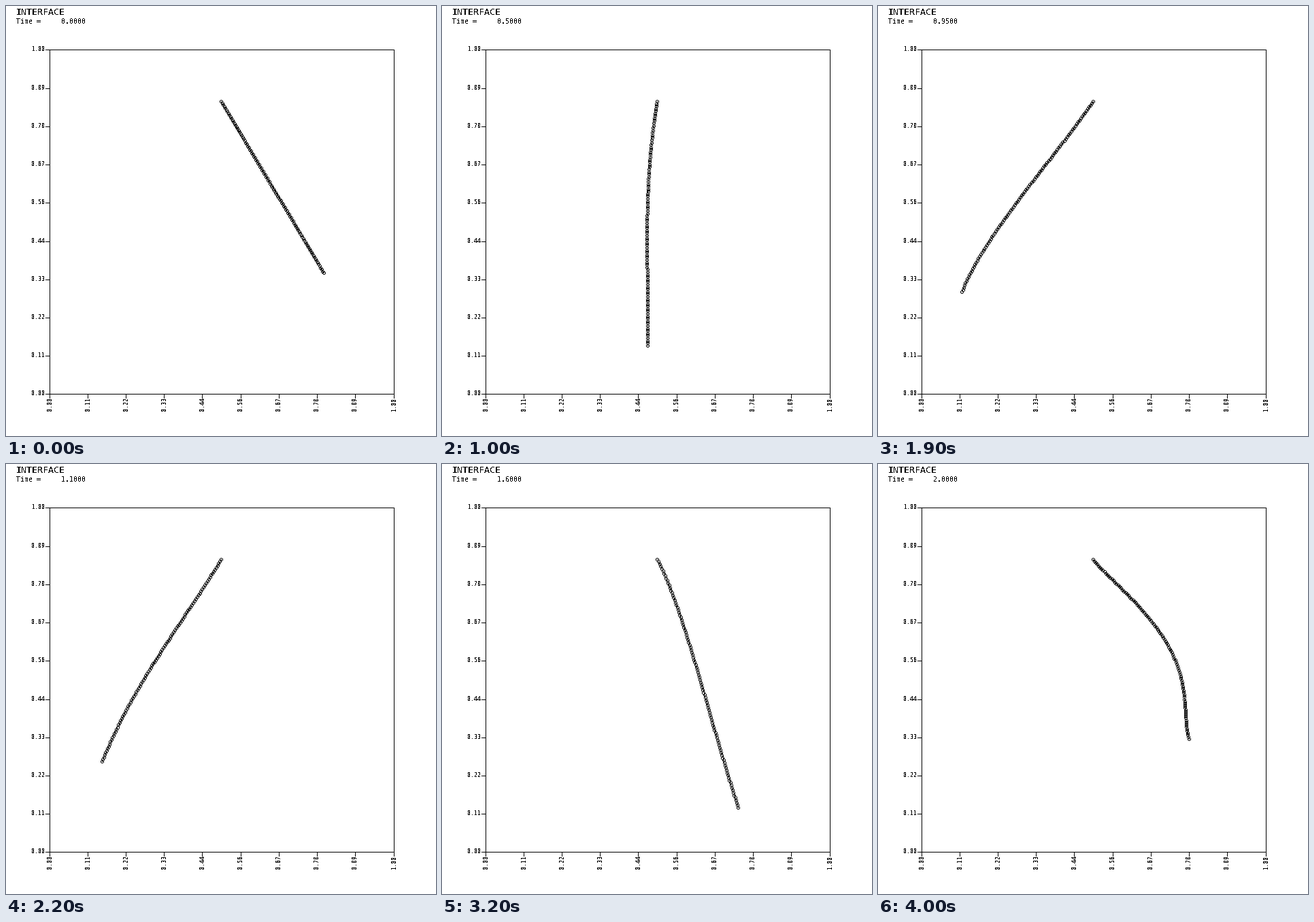
A matplotlib script that plays this animation: 632x632 px, repeating every 4.1 s.

```python
import numpy as np
import matplotlib.pyplot as plt
from matplotlib.animation import FuncAnimation

SIZE, DPI = 632, 100
PX = 72 / DPI                 # one pixel in points
LO, HI = 63, 569              # plot box edges
PIVOT = np.array([316, 140])
BEADS = 101
FRAMES, STEP = 41, 0.05

# Key poses of the swing: time, chord angle (deg), chord length, sideways bow
POSES = np.array([
    (0.00, 30.9, 293.8, 0), (0.30, 17.5, 382.7, -6.8),
    (0.60, -12.8, 336, -9), (0.75, -26.2, 326.5, -11.8),
    (1.10, -30.5, 344.7, -10), (1.35, -5.7, 340.7, -7),
    (1.60, 18.1, 383.9, 6.8), (1.80, 29, 321.4, 22),
    (2.00, 28.1, 299.3, 42.5)])


def spline(x, y, q):
    """Natural cubic spline through (x, y), evaluated at q."""
    n, h = len(x), np.diff(x)
    slope = np.diff(y) / h
    a, b = np.eye(n), np.zeros(n)
    for i in range(1, n - 1):
        a[i, i - 1:i + 2] = h[i - 1], 2 * (h[i - 1] + h[i]), h[i]
        b[i] = 6 * (slope[i] - slope[i - 1])
    m = np.linalg.solve(a, b)
    k = np.clip(np.searchsorted(x, q) - 1, 0, n - 2)
    u, v, w = q - x[k], x[k + 1] - q, h[k]
    return ((m[k] * v**3 + m[k + 1] * u**3) / (6 * w)
            + (y[k] / w - m[k] * w / 6) * v
            + (y[k + 1] / w - m[k + 1] * w / 6) * u)


times = np.arange(FRAMES) * STEP
# mirrored in time, so that the motion starts at rest
knots = np.r_[-POSES[:0:-1, 0], POSES[:, 0]]
angle, length, bow = (spline(knots, np.r_[col[:0:-1], col], times)
                      for col in POSES[:, 1:].T)
angle = np.radians(angle)
# height of the bulge, travelling down and up the string
bulge = 0.47 + 0.2 * np.cos(4.6 * (times - 0.95))


def string_curve(i):
    """Dense curve of the string and its evenly spaced beads, in pixels."""
    f = np.linspace(0, 1, 800)
    p, sharp = bulge[i], 2.8
    shape = ((f / p)**p * ((1 - f) / (1 - p))**(1 - p))**sharp
    x = length[i] * np.sin(angle[i]) * f + bow[i] * shape
    y = length[i] * np.cos(angle[i]) * f
    arc = np.r_[0, np.cumsum(np.hypot(np.diff(x), np.diff(y)))]
    s = np.linspace(0, arc[-1], BEADS)
    beads = np.column_stack([np.interp(s, arc, x), np.interp(s, arc, y)])
    curve = np.column_stack([x, y])
    return [np.rint(c + PIVOT).astype(int) for c in (curve, beads)]


# Small hollow circle, five pixels across
gx, gy = np.mgrid[-2:3, -2:3]
on_ring = np.isin(gx**2 + gy**2, (4, 5))
RING = np.column_stack([gx[on_ring], gy[on_ring]])


def string_image(i):
    img = np.full((SIZE, SIZE), 255, np.uint8)
    curve, beads = string_curve(i)
    px = np.vstack([curve, (beads[:, None] + RING).reshape(-1, 2)])
    img[px[:, 1], px[:, 0]] = 0
    return img


fig = plt.figure(figsize=(SIZE / DPI, SIZE / DPI), dpi=DPI, facecolor="white")
picture = fig.figimage(string_image(0), cmap="gray", vmin=0, vmax=255,
                       origin="upper", zorder=-1)
ax = fig.add_axes([0, 0, 1, 1])
ax.set_xlim(0, SIZE)
ax.set_ylim(SIZE, 0)
ax.axis("off")


def line(xs, ys):
    ax.plot(np.array(xs) + 0.5, np.array(ys) + 0.5, color="black",
            lw=PX, antialiased=False, solid_capstyle="projecting")


def label(x, y, text, pitch, rotation=0):
    # the mono font advances 0.602 em per character
    return ax.text(x, y, text, family="DejaVu Sans Mono", color="black",
                   size=pitch / 0.602 * PX, rotation=rotation,
                   rotation_mode="anchor", ha="left", va="baseline",
                   antialiased=False)


line([LO, HI, HI, LO, LO], [LO, LO, HI, HI, LO])
for k in range(10):
    off = (HI - LO) * k // 9
    value = f"{k / 9:.2f}"
    line([LO - 6, LO], [HI - off] * 2)
    label(38, HI - off + 3, value, 5)
    line([LO + off] * 2, [HI, HI + 6])
    label(LO + off + 4, 595, value, 5, rotation=90)

label(15, 13, "INTERFACE", 8)
clock = label(15, 26, "", 6)


def update(i):
    picture.set_data(string_image(i))
    clock.set_text(f"Time ={times[i]:11.4f}")
    return picture, clock


anim = FuncAnimation(fig, update, frames=FRAMES, interval=100, repeat=True,
                     repeat_delay=0, blit=False)
plt.show()
```
